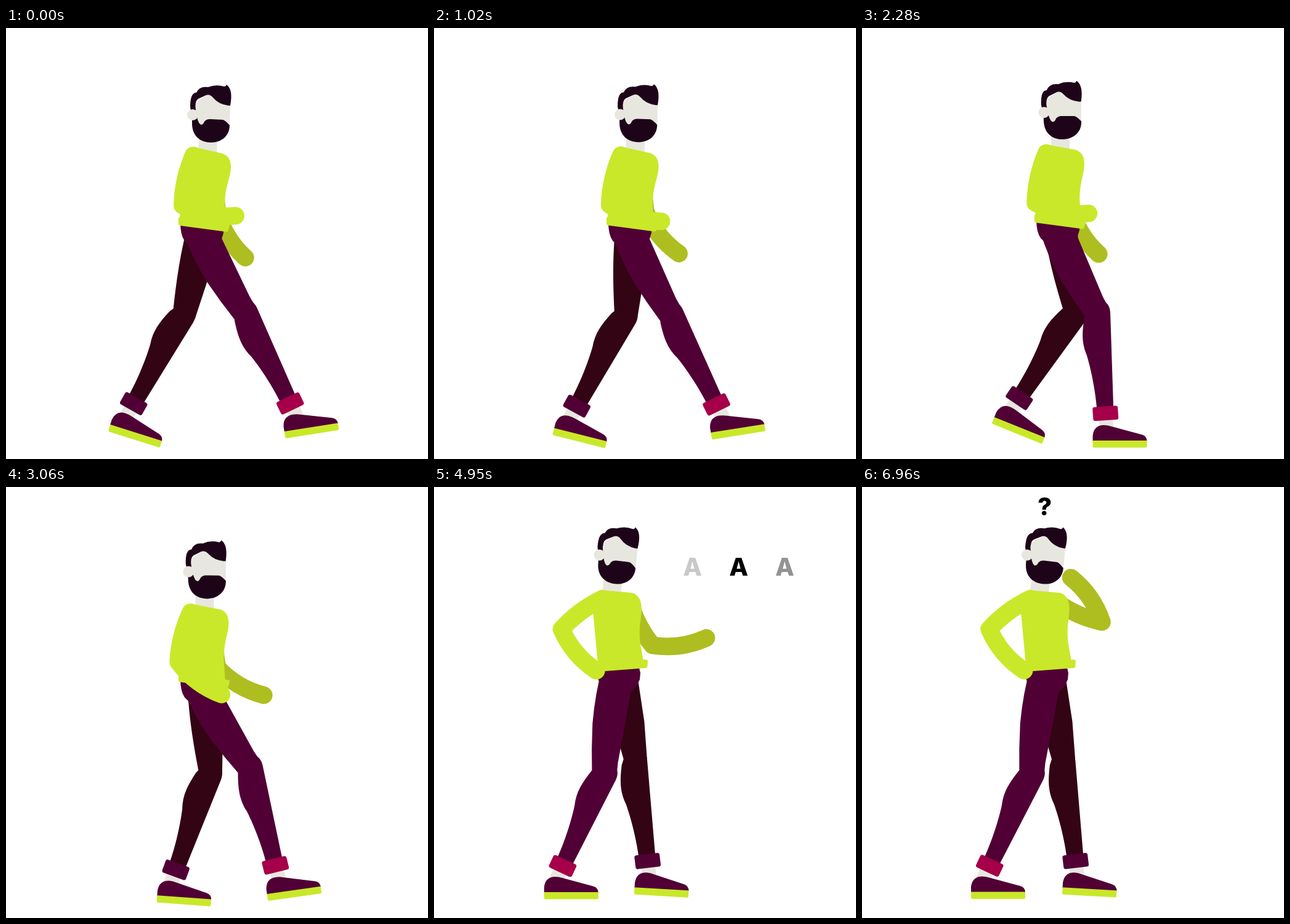
Write an HTML page with a canvas that moves like this. It is 685x700 px and loops after 6.99 s.

```html
<!DOCTYPE html>
<html lang="en">
<head>
<meta charset="utf-8">
<title>Walking, talking, wondering</title>
<style>
  html, body { margin: 0; width: 100%; height: 100%; overflow: hidden; background: #fff; }
  canvas { display: block; }
</style>
</head>
<body>
<canvas id="stage" width="685" height="700"></canvas>
<script>
const ctx = document.getElementById('stage').getContext('2d');
const LOOP = 6990, STRIDE = 1066, RAD = Math.PI / 180;
const SHIN = 184, FORE = 88;
const INK = { lime: '#c9e82a', olive: '#aebe20', plum: '#510036', wine: '#330414',
              red: '#a50049', skin: '#e7e7df', hair: '#1e0419' };

const shape = {
  nearThigh: new Path2D('M-30-8Q-36 30-33 77Q-29 115-22 152L8 158L18 150L17 130L21 26V0Z'),
  farThigh: new Path2D('M-27-8L-26 30Q-26 77-19 140L-18 152L8 158L19 150L25 88L27 0Z'),
  shin: new Path2D('M6-19Q19-14 19 2L13.5 156H-13.5C-14 120-20 85-24 68C-31 47-29 30-23 5L-16-10Z'),
  pelvis: new Path2D('M-37-14L33-6V3L30 13Q14 38-14 32L-30 16Q-37 6-37-14Z'),
  shoe: new Path2D('M-22 26V17Q-20 0-4 0Q2 0 8 2L58 15.5Q66 18 66 26Z'),
  torso: new Path2D('M-16-129L32-118Q45-113 45-97C45-78 35-66 35-32L36-2L-38-12L-34-95Q-32-127-16-129Z'),
  hem: new Path2D('M-37-12L40-1.5L38 6L-37-4Z'),
  neck: new Path2D('M-15-18L15-12L14 9L-16 4Z'),
  face: new Path2D('M-22-40L-20-74L2-90L36-70L35-32H-16Z'),
  hair: new Path2D('M-26-50L-29-67Q-29-90-19-90Q-14-101 0-99Q13-104 26-100Q29-100 30-103Q41-95 36-69L33-69Q17-71 8-82Q3-88-3-86L-16-80Q-22-76-20-62L-18-47Z'),
  beard: new Path2D('M-26-52L-18-50Q-15-38-11-38Q-8-38-6-43Q-3-47 3-47L24-46Q28-45 35-37C35-20 22-9 5-9C-13-9-26-20-26-40Z')
};

const mix = (a, b, k) => a + (b - a) * k;
const ease = k => { k = Math.min(1, Math.max(0, k)); return k * k * (3 - 2 * k); };
const turn = (x, y, deg) => {
  const c = Math.cos(deg * RAD), s = Math.sin(deg * RAD);
  return [x * c - y * s, x * s + y * c];
};
const blend = (a, b, k) =>
  Object.fromEntries(Object.keys(a).map(n => [n, mix(a[n], b[n], k)]));

// One stride of a foot: phase, ankle x, ankle y, tilt
const STEPS = [
  [0, 470, 627, -9], [.139, 397, 645, 0], [.3, 297, 645, 0], [.37, 252, 640, 4],
  [.457, 205, 631, 14], [.5, 180, 627, 17.5], [.54, 179, 622, 21], [.639, 226, 617, 22],
  [.75, 336, 617, 9], [.87, 441, 633, -8], [.957, 467, 629, -9]
];
const stepAt = i => {
  const n = STEPS.length, lap = Math.floor(i / n), s = STEPS[i - lap * n];
  return [s[0] + lap, s[1], s[2], s[3]];
};
function footAt(phase) {
  phase -= Math.floor(phase);
  let i = STEPS.length - 1;
  while (STEPS[i][0] > phase) i--;
  const [o, a, b, c] = [i - 1, i, i + 1, i + 2].map(stepAt);
  const w = b[0] - a[0], k = (phase - a[0]) / w, k2 = k * k, k3 = k2 * k;
  return [1, 2, 3].map(j => {
    const m = (b[j] - o[j]) / (b[0] - o[0]) * w, n = (c[j] - a[j]) / (c[0] - a[0]) * w;
    return (2 * k3 - 3 * k2 + 1) * a[j] + (k3 - 2 * k2 + k) * m
         + (3 * k2 - 2 * k3) * b[j] + (k3 - k2) * n;
  });
}

function walk(t) {
  const p = t / STRIDE;
  const lift = 1 - Math.cos(4 * Math.PI * p);
  const swing = Math.cos(2 * Math.PI * (p - .07));
  const [nx, ny, nt] = footAt(p), [fx, fy, ft] = footAt(p + .5);
  return {
    x: 320, y: 322 - 4 * lift, lean: -2.05 * lift, waist: 0, head: -2.05 * lift, headX: 0,
    hipX: 320, hipY: 330 - 4 * lift,
    nx, ny, nt, fx: fx + 18, fy, ft, nThigh: 148.7 + 1.5 * lift, fThigh: 145.3 + 1.2 * lift,
    nUp: 102 + 3 * (1 - swing), nFore: 51 - 44 * swing,
    fUp: 94 - 5 * (1 - swing), fFore: 16 + 47 * swing
  };
}

// Standing poses; each one changes only what it names
const POSES = [
  { t: 3650, x: 316, y: 287, lean: -3, waist: -2, head: 2, headX: -2, hipX: 309, hipY: 306,
    nx: 302, ny: 624, nt: 0, fx: 349, fy: 628, ft: 9, nThigh: 149, fThigh: 140,
    nUp: 112, nFore: 66, fUp: 84, fFore: 45 },
  { t: 4230, x: 318, y: 294, lean: 4, waist: 5, head: 21, headX: -3, hipX: 308, hipY: 312,
    fThigh: 138, nUp: 127, nFore: 54.7, fUp: 76, fFore: 21 },
  { t: 4400, fFore: 18 },
  { t: 4980, x: 305, y: 293, lean: -8, waist: -12, head: 4, headX: -6, hipX: 302, hipY: 306,
    nx: 200, ny: 633, fx: 349, fy: 626.5, ft: 3.3, nThigh: 162, fThigh: 145,
    nUp: 143.4, nFore: 50, fUp: 62, fFore: -8 },
  { t: 5400, nx: 198.5, fUp: 57, fFore: -30 },
  { t: 5790, nx: 198, fUp: 55.7, fFore: -34 },
  { t: 6330, nx: 195.5, fUp: 23.5, fFore: -125 },
  { t: 6990, nx: 199, ny: 632.5 }
];
POSES.forEach((p, i) => { if (i) POSES[i] = { ...POSES[i - 1], ...p }; });

function stand(t) {
  if (t <= POSES[0].t) return POSES[0];
  const i = POSES.findIndex(p => p.t >= t), a = POSES[i - 1], b = POSES[i];
  return blend(a, b, ease((t - a.t) / (b.t - a.t)));
}
function poseAt(t) {
  if (t < 3120) return walk(t);
  if (t >= 3650) return stand(t);
  return blend({ ...walk(t), t }, POSES[0], ease((t - 3120) / 530));
}

function place(x, y, deg, draw, stretch = 1) {
  ctx.save();
  ctx.translate(x, y);
  ctx.rotate(deg * RAD);
  ctx.scale(1, stretch);
  draw();
  ctx.restore();
}
function fill(path, color) {
  ctx.fillStyle = color;
  ctx.fill(path);
}
function box(x, y, w, h, r, color) {
  ctx.fillStyle = color;
  ctx.beginPath();
  ctx.roundRect(x, y, w, h, r);
  ctx.fill();
}

function leg(hx, hy, ax, ay, tilt, thigh, path, cloth, cuff) {
  const dx = ax - hx, dy = ay - hy, d = Math.hypot(dx, dy);
  const along = (thigh * thigh - SHIN * SHIN + d * d) / (2 * d);
  const out = Math.sqrt(Math.max(0, thigh * thigh - along * along));
  const kx = hx + (dx * along + dy * out) / d, ky = hy + (dy * along - dx * out) / d;
  const aim = (x, y) => Math.atan2(y, x) / RAD - 90;
  const shin = aim(ax - kx, ay - ky);
  place(kx, ky, shin, () => box(-11.5, 168, 23, 22, 0, INK.skin));
  place(ax, ay, tilt, () => {
    fill(shape.shoe, INK.plum);
    box(-22, 25, 88, 11.5, [0, 1, 2, 2], INK.lime);
  });
  place(hx, hy, aim(kx - hx, ky - hy), () => fill(path, cloth),
        Math.hypot(kx - hx, ky - hy) / 149);
  place(kx, ky, shin, () => {
    fill(shape.shin, cloth);
    box(-20.5, 153.5, 41, 22.5, 3.5, cuff);
  });
}

function arm(p, sx, sy, upper, up, fore, color) {
  const [ox, oy] = turn(sx, sy, p.lean);
  let x = p.x + ox, y = p.y + oy;
  ctx.beginPath();
  ctx.moveTo(x, y);
  for (const [len, deg, bow] of [[upper, up, 8], [FORE, fore, 13]]) {
    const [cx, cy] = turn(len / 2, bow, deg), [ex, ey] = turn(len, 0, deg);
    ctx.quadraticCurveTo(x + cx, y + cy, x += ex, y += ey);
  }
  ctx.lineWidth = 28.5;
  ctx.lineCap = ctx.lineJoin = 'round';
  ctx.strokeStyle = color;
  ctx.stroke();
}

function glyph(ch, x, y, alpha) {
  if (alpha <= 0) return;
  ctx.globalAlpha = Math.min(1, alpha);
  ctx.fillStyle = '#000';
  ctx.font = '800 40px Inter, sans-serif';
  ctx.textAlign = 'center';
  ctx.fillText(ch, x, y);
  ctx.globalAlpha = 1;
}

function figure(p) {
  arm(p, 27.5, -102, 78, p.fUp, p.fFore, INK.olive);
  leg(p.hipX, p.hipY - 5, p.fx, p.fy, p.ft, p.fThigh, shape.farThigh, INK.wine, INK.plum);
  leg(p.hipX, p.hipY, p.nx, p.ny, p.nt, p.nThigh, shape.nearThigh, INK.plum, INK.red);
  place(p.hipX, p.hipY, p.waist, () => fill(shape.pelvis, INK.plum));

  const [ox, oy] = turn(8, -127, p.lean);
  const atNeck = draw => place(p.x + ox + p.headX, p.y + oy, p.head, draw);
  atNeck(() => fill(shape.neck, INK.skin));
  place(p.x, p.y, p.lean, () => fill(shape.torso, INK.lime));
  place(p.x, p.y, p.waist, () => {
    fill(shape.hem, INK.lime);
    ctx.lineWidth = 6;
    ctx.lineJoin = 'round';
    ctx.strokeStyle = INK.lime;
    ctx.stroke(shape.hem);
  });
  arm(p, -16, -115, 83, p.nUp, p.nFore, INK.lime);
  atNeck(() => {
    fill(shape.face, INK.skin);
    fill(shape.hair, INK.hair);
    fill(shape.beard, INK.hair);
    box(-34, -63, 18, 18, 9, INK.skin);
  });
}

function render(t) {
  ctx.fillStyle = '#fff';
  ctx.fillRect(0, 0, 685, 700);
  figure(poseAt(t));
  // Spoken letters drift away from the mouth
  for (const start of [4200, 4540, 4880]) {
    const k = (t - start) / 840;
    if (k > 0 && k < 1) glyph('A', 404 + 185 * k, 143.5, Math.min(k / .4, (1 - k) / .25));
  }
  glyph('?', 296.5, 46, (t - 6180) / 240);
}

function tick() {
  render(performance.now() % LOOP);
  requestAnimationFrame(tick);
}
tick();
</script>
</body>
</html>
```
